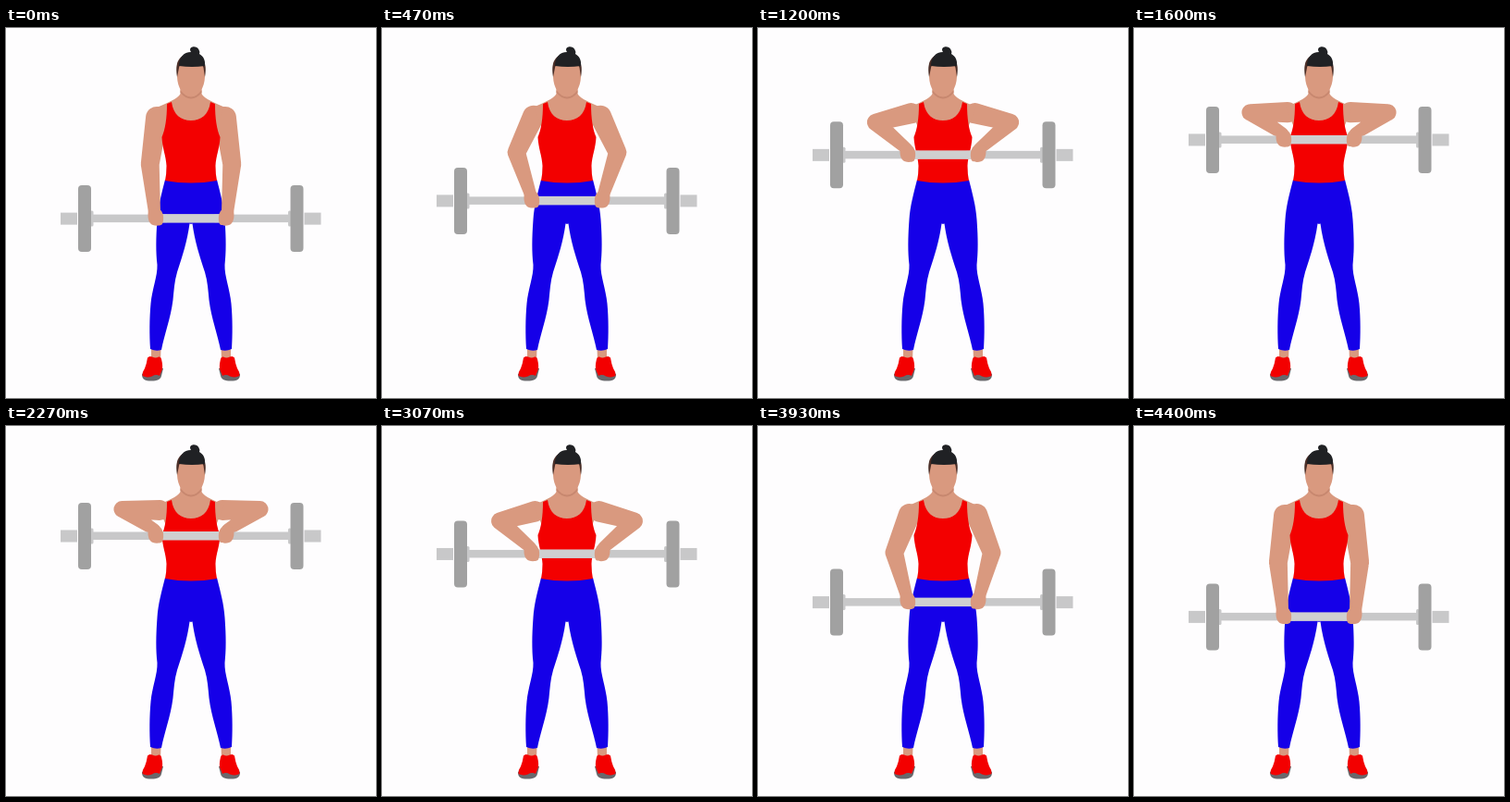
These frames come from a looping animation (400x400 px, 4470 ms). An HTML page:

```html
<!DOCTYPE html>
<html lang="en">
<head>
<meta charset="utf-8">
<title>Barbell upright row</title>
<style>
  html, body { margin: 0; width: 100%; height: 100%; overflow: hidden; background: #fefdfe; }
  svg { display: block; width: 100vw; height: 100vh; }
  .skin { fill: #d9997f; }
  .top { fill: #f30000; }
  .pants { fill: #1500e8; }
  .hair { fill: #202124; }
  .sides { fill: #4b2e27; }
  .sole { fill: #68686c; }
  .plate { fill: #a1a1a1; }
  .rod { fill: #c8c8c9; }
  .grip { fill: #cfcfd0; }
</style>
</head>
<body>
<svg viewBox="0 0 400 400">
  <defs>
    <path id="arm" class="skin"/>
    <g id="leg">
      <path class="skin" d="M157 345H167.500L167 361H157Z"/>
      <path class="pants" d="M201 164H172C168 180 164.500 192 163.500 207C162 228 162 242 163.500 256C164 268 158 282 156.500 298C155 314 155 332 156 347Q162 350 168 348C171 332 178 314 180.500 294C181.500 284 182 274 185 264C191 246 196 230 198.500 211.500H201Z"/>
      <path class="sole" d="M147 374C147 380 150 381.500 157 381.500C164 381.500 167 380 168 376L170 368L160 365Z"/>
      <path class="top" d="M153 356.500Q155 354 158 355.500Q162 357.500 165 355.500Q167.500 355 168 358Q170 366 168.500 370L166 376Q162 374 158 376.500Q152 378.500 147.500 376Q147 372 150 368Q152 363 153 356.500Z"/>
    </g>
    <path id="hand" class="skin" d="M154 -9C153 -3 153.500 2 156 5C158 8 165 8.500 168.500 6.500C170.500 4 170.500 -2 169.500 -5Q168 -9 165 -11Z"/>
    <g id="end">
      <rect class="rod" x="59" y="-6.500" width="18" height="13"/>
      <rect class="rod" x="91" y="-8.500" width="3.500" height="17" rx="1.500"/>
      <rect class="rod" x="94" y="-4.500" width="80" height="8.500"/>
      <rect class="plate" x="78" y="-36" width="14" height="72" rx="4"/>
    </g>
  </defs>

  <use href="#leg"/><use href="#leg" transform="matrix(-1 0 0 1 400 0)"/>
  <use href="#arm"/><use href="#arm" transform="matrix(-1 0 0 1 400 0)"/>
  <path class="skin" d="M188.500 64V71Q187 76 164 85.500L174 110H226L236 85.500Q213 76 211.500 71V64Z"/>
  <path class="top" d="M174 82L179 80C181 94 189 100 200 100C211 100 219 94 221 80L226 82C226 98 228 110 231.500 118C231 130 227 138 226.500 149Q226.500 158 228 165Q200 170 172 165Q173.500 158 173.500 149C173 138 169 130 168.500 118C172 110 174 98 174 82Z"/>
  <path fill="#c7876f" d="M188.500 67Q200 82 211.500 67V70Q200 83 188.500 70Z"/>
  <path class="sides" d="M185 53C182 36 188 28 200 28C212 28 218 36 215 53Z"/>
  <path class="skin" d="M187 43Q187 40 191 39.500Q200 42 210 39.500Q213 40 213.500 43L215 53C214.500 64 209 74 200 74C191 74 185.500 64 185 53Z"/>
  <path class="hair" d="M187 41C187 32 192 26 200 26C196 20 206 18 208.500 23.500Q210 26 209 28C214 31 215.500 35 215 41Q201 43 187 41Z"/>

  <g id="bar">
    <use href="#end"/><use href="#end" transform="matrix(-1 0 0 1 399.500 0)"/>
    <rect class="grip" x="168" y="-5" width="64" height="9.500"/>
    <use href="#hand"/><use href="#hand" transform="matrix(-1 0 0 1 400 0)"/>
  </g>
</svg>
<script>
  const LOOP = 4470, STEP = LOOP / 67;
  const LOW = 207.5, HIGH = 119;

  const arm = document.getElementById('arm');
  const bar = document.getElementById('bar');

  const mix = (a, b, k) => a + (b - a) * k;
  const ease = u => (1 - Math.cos(Math.PI * Math.min(1, Math.max(0, u)))) / 2;
  // Raise, hold at the top, lower.
  const lift = t => t < 2000 ? ease((t + 155) / 1940) : 1 - ease((t - 2398) / 2160);

  // Tapered limb with a round cap at each joint.
  function limb(a, b) {
    const dx = b.x - a.x, dy = b.y - a.y, len = Math.hypot(dx, dy);
    const side = (p, s) => `${p.x - s * p.r * dy / len} ${p.y + s * p.r * dx / len}`;
    return `M${side(a, -1)}L${side(b, -1)}A${b.r} ${b.r} 0 0 1 ${side(b, 1)}` +
      `L${side(a, 1)}A${a.r} ${a.r} 0 0 1 ${side(a, -1)}Z`;
  }

  function draw(now) {
    const t = Math.floor((now % LOOP) / STEP + 0.1) * STEP;
    const p = lift(t);
    const y = mix(LOW, HIGH, p);

    // The elbow swings outwards early while it rises evenly.
    const shoulder = { x: mix(163, 166, p), y: mix(97, 91, p), r: mix(12, 11, p) };
    const elbow = { x: 156.5 - 31 * Math.sin(p * Math.PI / 2), y: mix(148, 90, p), r: mix(10, 9, p) };
    const wrist = { x: 160.5, y: y - 7, r: 6.5 };

    arm.setAttribute('d', limb(shoulder, elbow) + limb(elbow, wrist));
    bar.setAttribute('transform', `translate(0 ${y.toFixed(2)})`);
  }

  const start = performance.now();
  function tick() {
    draw(performance.now() - start);
    requestAnimationFrame(tick);
  }
  tick();
</script>
</body>
</html>
```
